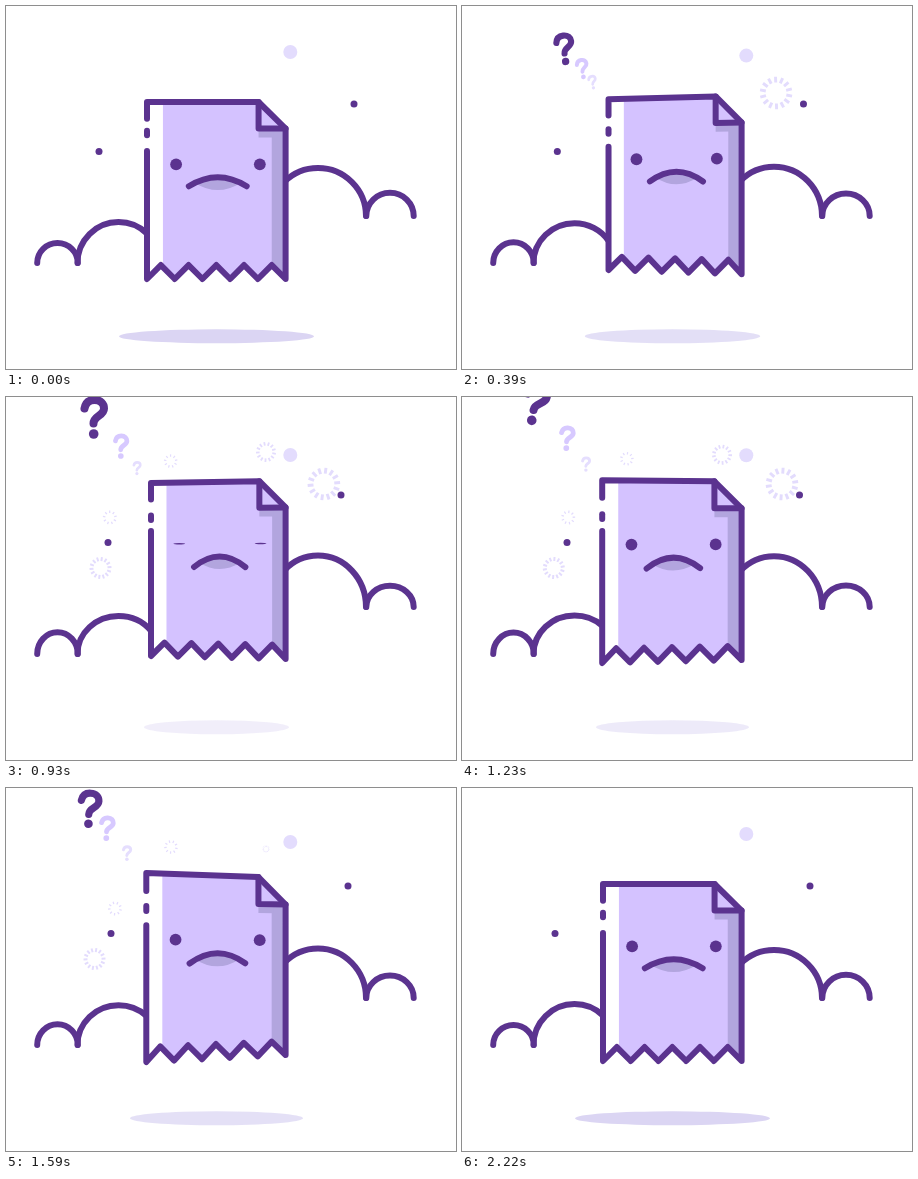
Write an HTML page with a canvas that moves like this. It is 450 px wide and 363 px high and loops after 2.25 s.

```html
<!DOCTYPE html>
<html lang="en">
<head>
<meta charset="utf-8">
<title>Sad page</title>
<style>
  html, body { margin: 0; width: 100%; height: 100%; overflow: hidden; background: #fff; }
  canvas { display: block; }
</style>
</head>
<body>
<canvas id="stage" width="450" height="363"></canvas>
<script>
const LOOP = 2250, STEP = 30;
const INK = '#5b338f', LILAC = '#d4c2ff', SHADE = '#b2a5de', PALE = '#e3dcfd';
const ctx = document.getElementById('stage').getContext('2d');

const lerp = (a, b, k) => a + (b - a) * k;
const clamp = k => Math.max(0, Math.min(1, k));
const smooth = k => { k = clamp(k); return k * k * (3 - 2 * k); };

// Smooth curve through (times, values), at rest at both ends.
function track(times, values) {
  const last = times.length - 1;
  const slope = i => i === 0 || i === last ? 0 :
    (values[i + 1] - values[i - 1]) / (times[i + 1] - times[i - 1]);
  return t => {
    if (t <= times[0]) return values[0];
    if (t >= times[last]) return values[last];
    let i = 0;
    while (t > times[i + 1]) i++;
    const d = times[i + 1] - times[i], k = (t - times[i]) / d, m = 1 - k;
    return values[i] * (1 + 2 * k) * m * m + slope(i) * d * k * m * m +
      values[i + 1] * k * k * (3 - 2 * k) - slope(i + 1) * d * k * k * m;
  };
}

// Tracks that leave a rest value and come back to it within the loop.
const BEATS = [0, 240, 570, 930, 1230, 1590, 2235];
const sway = (rest, ...mid) => track(BEATS, [rest, ...mid, rest]);

const page = {
  right: 279.6,
  left: sway(141, 144, 148.6, 145, 140.2, 140.3),
  tl: sway(96, 95, 91, 86, 83.3, 85),
  tr: sway(96, 92.7, 86.3, 83.7, 84.5, 90),
  bl: sway(273, 268, 260, 259, 266, 274),
  br: sway(273, 271, 265, 262, 263, 267)
};
const rise = sway(0, .16, .68, 1, .84, .44);
const dotLeft = sway(93, 94, 97.3, 102, 105, 105);
const dotRight = sway(348, 345, 337.5, 335, 337.5, 342);
const moonY = sway(46, 47.5, 52.5, 58, 58.3, 54);

function mark(color, times, x, y, size, turn) {
  return { color, x: track(times, x), y: track(times, y), size: track(times, size), turn: track(times, turn) };
}
const SLOW = [110, 240, 570, 930, 1230, 1590, 1860];
const marks = [
  mark('#e5defe', SLOW, [134, 128, 134, 131, 124, 121, 129], [92, 79, 75, 71, 67, 65, 82],
    [0, .3, .33, .33, .36, .37, 0], [-20, -20, 0, 0, 0, 0, 0]),
  mark('#d7c9ff', SLOW, [130, 124, 117, 115, 105, 101, 122], [86, 73, 53, 49, 41, 40, 74],
    [0, .35, .59, .59, .6, .6, 0], [-20, -18, 0, 0, 3, 3, 0]),
  mark(INK, [90, 240, 570, 930, 1050, 1230, 1590, 1850], [128, 117, 88, 88, 65, 73.3, 83.5, 122],
    [85, 66, 20, 20, 4, 6.7, 20.5, 78], [0, .47, 1, 1, 1, 1, .9, 0], [-20, -14, 0, 0, 10, 11, 3, 0])
];

// Rings drift from one point to another between the times t0 and t1.
const rings = [
  { r: 16.3, n: 14, from: [313, 87], to: [320, 87], t0: 240, t1: 1230, show: 80, hide: 1360 },
  { r: 6.8, n: 9, from: [164.5, 67], to: [165, 59], t0: 570, t1: 1590, show: 380, hide: 1800 },
  { r: 7, n: 9, from: [101, 120.5], to: [109, 120.5], t0: 570, t1: 1590, show: 380, hide: 1800 },
  { r: 11, n: 14, from: [94.5, 171], to: [88.5, 171], t0: 930, t1: 1590, show: 680, hide: 1740 },
  { r: 10, n: 13, from: [260, 55], to: [260, 61], t0: 930, t1: 1590, show: 680, hide: 1475 }
];

function disc(x, y, rx, color, ry = rx) {
  ctx.fillStyle = color;
  ctx.beginPath();
  ctx.ellipse(x, y, rx, ry, 0, 0, 2 * Math.PI);
  ctx.fill();
}

function drawShadow(s) {
  ctx.globalAlpha = 1 - .6 * s;
  disc(210.5, 330.3, 97.5 - 25 * s, '#dbd5f3', 7);
  ctx.globalAlpha = 1;
}

function arch(x, y, rx, ry, endX = x + rx) {
  ctx.beginPath();
  ctx.ellipse(x, y, rx, ry, 0, Math.PI, 2 * Math.PI - Math.acos((endX - x) / rx));
  ctx.stroke();
}

function drawClouds(s, left) {
  ctx.strokeStyle = INK;
  ctx.lineWidth = 6;
  arch(51.5, 257, 20.3, 20 + 1.7 * s);
  arch(112.5, 257, 41, 41 - 3 * s, left);
  arch(312, 210, 48, 48 + 3.4 * s);
  arch(384, 210, 23.7, 23.3 - 2 * s);
}

function drawRing(ring, t) {
  const grow = smooth((t - ring.show) / 150) * (1 - smooth((t - ring.hide) / 190));
  if (grow < .01) return;
  const k = (t - ring.t0) / (ring.t1 - ring.t0);
  ctx.save();
  ctx.translate(lerp(ring.from[0], ring.to[0], k), lerp(ring.from[1], ring.to[1], k));
  ctx.scale(grow, grow);
  ctx.rotate(t / LOOP * 2 * Math.PI);
  ctx.strokeStyle = PALE;
  ctx.lineWidth = ring.r * .18;
  ctx.beginPath();
  for (let i = 0; i < ring.n; i++) {
    const a = i / ring.n * 2 * Math.PI, c = Math.cos(a), d = Math.sin(a);
    ctx.moveTo(c * ring.r * .64, d * ring.r * .64);
    ctx.lineTo(c * ring.r, d * ring.r);
  }
  ctx.stroke();
  ctx.restore();
}

const hook = new Path2D('M-9.5 -8.5C-8.5 -14 -5 -17 0.5 -17C6.5 -17 10 -13.5 10 -8.5C10 -1 -0.5 -1.5 -0.5 6.5');
function drawMark(m, t) {
  const size = m.size(t);
  if (size < .01) return;
  ctx.save();
  ctx.translate(m.x(t), m.y(t));
  ctx.rotate(m.turn(t) * Math.PI / 180);
  ctx.scale(size, size);
  ctx.strokeStyle = m.color;
  ctx.lineWidth = 8;
  ctx.stroke(hook);
  disc(-.3, 17, 4.8, m.color);
  ctx.restore();
}

function drawPage(t) {
  const left = page.left(t), tl = page.tl(t), tr = page.tr(t), bl = page.bl(t), br = page.br(t);
  const lift = clamp((96 - tr) / 12.5);
  const at = (u, v) => [lerp(left, page.right, u), lerp(lerp(tl, tr, u), lerp(bl, br, u), v)];
  const trace = pts => {
    ctx.beginPath();
    pts.forEach(p => ctx.lineTo(...at(...p)));
  };
  const fill = (color, pts) => { trace(pts); ctx.fillStyle = color; ctx.fill(); };
  const box = (color, u0, v0, u1, v1) => fill(color, [[u0, v0], [u1, v0], [u1, v1], [u0, v1]]);

  const FU = .805, FV = .15;
  const teeth = Array.from({ length: 11 }, (_, i) => [1 - i / 10, i % 2 ? .921 : 1]);
  const edge = [[0, 0], [FU, 0], [1, FV], ...teeth];

  ctx.save();
  trace(edge);
  ctx.clip();
  box('#fff', 0, 0, 1, 1);
  box(LILAC, .115, 0, 1, 1);
  box(SHADE, .9, FV, 1, 1);
  box(SHADE, FU, FV, .91, .2);
  fill(LILAC, [[FU, 0], [1, FV], [FU, FV]]);
  ctx.restore();

  ctx.strokeStyle = INK;
  ctx.lineWidth = 6;
  trace([[0, .095], ...edge, [0, .277]]);
  ctx.stroke();
  const dash = .162 + .026 * lift;
  trace([[0, dash], [0, dash + .026]]);
  ctx.stroke();
  trace([[FU, 0], [FU, FV], [1, FV]]);
  ctx.stroke();

  const blink = smooth(1 - Math.abs(t - 930) / 100);
  for (const u of [.21, .814]) disc(...at(u, .352), 5.9, INK, lerp(5.9, .8, blink));

  const u0 = .302 + .018 * lift, u1 = .719 - .018 * lift;
  const [x0, y0] = at(u0, .476 + .009 * lift), [x1, y1] = at(u1, .476 + .009 * lift);
  const [cx, cy] = at((u0 + u1) / 2, .425);
  const bend = 2 * cy - (y0 + y1) / 2;
  const [sx, sy] = at((u0 + u1) / 2, .5 - .008 * lift);
  ctx.fillStyle = SHADE;
  ctx.beginPath();
  ctx.moveTo(lerp(x0, cx, .2), lerp(y0, bend, .2));
  ctx.quadraticCurveTo(cx, bend, lerp(x1, cx, .2), lerp(y1, bend, .2));
  ctx.quadraticCurveTo(sx, sy + 7, lerp(x0, cx, .2), lerp(y0, bend, .2));
  ctx.fill();
  ctx.beginPath();
  ctx.moveTo(x0, y0);
  ctx.quadraticCurveTo(cx, bend, x1, y1);
  ctx.stroke();
}

function draw(t) {
  const s = rise(t);
  ctx.fillStyle = '#fff';
  ctx.fillRect(0, 0, 450, 363);
  ctx.lineJoin = 'round';
  drawShadow(s);
  ctx.lineCap = 'butt';
  rings.forEach(r => drawRing(r, t));
  ctx.lineCap = 'round';
  disc(284.3, moonY(t), 7, PALE);
  disc(dotLeft(t), 145.5, 3.5, INK);
  disc(dotRight(t), 98, 3.5, INK);
  marks.forEach(m => drawMark(m, t));
  drawClouds(s, page.left(t));
  drawPage(t);
}

const start = performance.now();
function tick() {
  const t = (performance.now() - start) % LOOP;
  draw(Math.floor(t / STEP) * STEP);
  requestAnimationFrame(tick);
}
tick();
</script>
</body>
</html>
```
